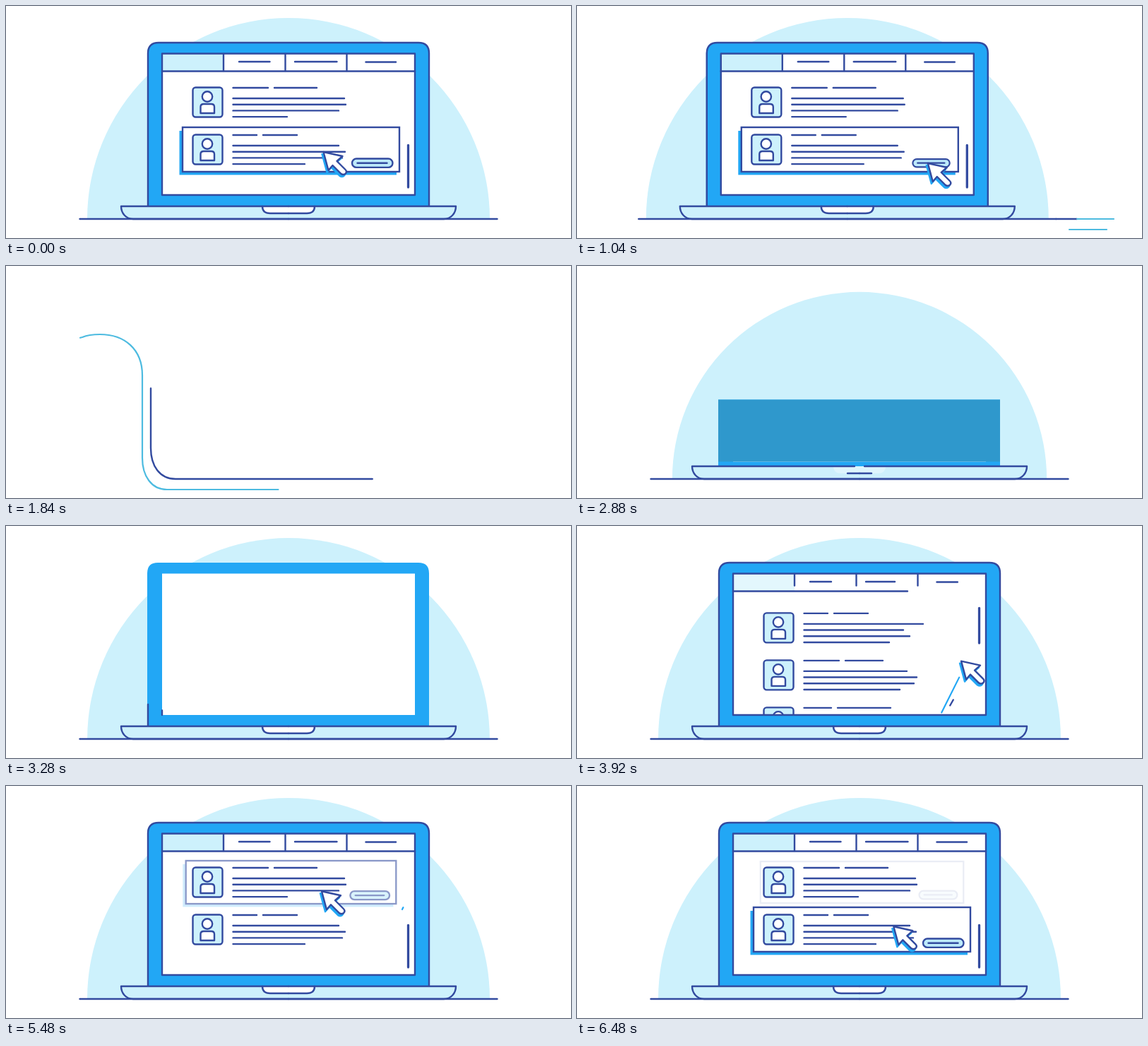
An HTML page for the animation above (6520 ms loop, 800x329 px).

```html
<!DOCTYPE html>
<html lang="en">
<head>
<meta charset="utf-8">
<title>Laptop list</title>
<style>
  html, body { margin: 0; width: 100%; height: 100%; overflow: hidden; background: #fff; }
  svg { display: block; width: 100vw; height: 100vh; }
  .ink { stroke: #324a9f; stroke-width: 2.4; stroke-linecap: round; stroke-linejoin: round; }
  .none { fill: none; }
  .white { fill: #fff; }
  .pale { fill: #cdf1fc; }
  .blue { fill: #22a7f5; }
  .wind { fill: none; stroke: #4dbbe0; stroke-width: 2.2; stroke-linecap: round; }
</style>
</head>
<body>
<svg id="stage" viewBox="0 0 800 329">
  <defs>
    <clipPath id="listClip"><rect x="221" y="94" width="358" height="173.5"/></clipPath>
    <clipPath id="cursorClip"><rect width="800" height="267"/></clipPath>
  </defs>

  <g id="scene">
    <clipPath id="skyClip"><rect width="800" height="302"/></clipPath>
    <circle id="sky" class="pale" cx="400" cy="302" clip-path="url(#skyClip)"/>

    <g id="lid">
      <path id="lidFill" class="blue"/>
      <rect class="white" x="221" y="67.5" width="358" height="200.5"/>
      <rect id="shade" x="200" y="52" width="399" height="216" fill="#2f98cc"/>
    </g>

    <g id="screen">
      <g id="cards"></g>
      <g clip-path="url(#listClip)"><g id="list"></g></g>
      <g id="buttons"></g>
      <rect id="tab" class="pale" x="221" y="68" width="87" height="24"/>
      <g id="tabLines" class="ink none"></g>
      <line id="bar" class="ink" x1="569.5" x2="569.5" style="stroke-width:3.3"/>
    </g>
    <path id="lidLine" class="ink none" pathLength="1" d="M201 284V67Q201 52 216 52H584Q599 52 599 67V284"/>
    <path id="screenLine" class="ink none" pathLength="1" d="M221 268V67.5H579V268Z"/>

    <path id="baseFill" class="pale" d="M163 284H637C637 294 630 302 620 302H180C170 302 163 294 163 284Z"/>
    <path id="notchFill" class="white" d="M363 284H437Q437 294 426 294H374Q363 294 363 284Z"/>
    <g id="baseLines" class="ink none"></g>
    <g id="notchLines" class="ink none"></g>
    <line id="ground" class="ink" x1="104.5" x2="695.5" y1="302" y2="302"/>

    <g clip-path="url(#cursorClip)">
      <line id="trail" class="wind" style="stroke:#22a7f5"/>
      <line id="tick" class="ink"/>
      <g id="cursor">
        <path class="blue" stroke="#22a7f5" stroke-width="2.4" stroke-linejoin="round"
              transform="translate(-2 3)" d="M0 0L27 6L19 13L31 25Q34 28 31 31Q28 33 25 31L13 19L7 26Z"/>
        <path class="ink white" d="M0 0L27 6L19 13L31 25Q34 28 31 31Q28 33 25 31L13 19L7 26Z"/>
      </g>
    </g>
  </g>

  <path id="navyWind" class="ink none" d="M800 302H240C218 302 205 284 205 258V165C205 125 165 112 140 112C70 112 30 150 30 205C30 260 60 302 104 302H696"/>
  <path id="endWind" class="wind" d="M800 302H240"/>
  <path id="cyanWind" class="wind" d="M800 317H228C206 317 193 298 193 272V155C193 118 168 97 133 97C125 97 115 98 108 101C50 115 14 155 14 210C14 270 50 317 104 317H420"/>
</svg>

<script>
const LOOP = 6520;
const ROW = 67;
const $ = id => document.getElementById(id);

const set = (el, attrs) => {
  for (const key in attrs) el.setAttribute(key, attrs[key]);
  return el;
};
const add = (parent, tag, attrs) =>
  parent.appendChild(set(document.createElementNS('http://www.w3.org/2000/svg', tag), attrs));

const linear = p => p;
const outQuad = p => 1 - (1 - p) ** 2;
const outCubic = p => 1 - (1 - p) ** 3;
const inOutQuad = p => p < 0.5 ? 2 * p * p : 1 - 2 * (1 - p) ** 2;
const inOutCubic = p => p < 0.5 ? 4 * p ** 3 : 1 - 4 * (1 - p) ** 3;
const lerp = (a, b, p) => a + (b - a) * p;
const ramp = (t, from, to, ease = linear) =>
  ease(Math.min(1, Math.max(0, (t - from) / (to - from))));

// Linear value along [time, value] stops.
function along(t, stops) {
  const next = stops.findIndex(stop => stop[0] > t);
  if (next === 0) return stops[0][1];
  if (next < 0) return stops[stops.length - 1][1];
  const [a, b] = [stops[next - 1], stops[next]];
  return lerp(a[1], b[1], ramp(t, a[0], b[0]));
}

function show(el, visible) {
  el.style.display = visible ? '' : 'none';
}

function trim(el, tail, head) {
  show(el, head - tail > 0.001);
  set(el, { 'stroke-dasharray': `${head - tail} 9999`, 'stroke-dashoffset': -tail });
}

// Row text: end of first heading part, end of second, ends of the four lines.
const rows = [
  [355, 412, 490, 462, 471, 442],
  [371, 433, 467, 481, 477, 457],
  [360, 444, 476, 475, 485, 457],
  [371, 440, 479, 481, 471, 398],
  [355, 412, 471, 480, 476, 423]
];
rows.forEach(([first, second, ...ends], i) => {
  const row = add($('list'), 'g', { class: 'ink', transform: `translate(0 ${115 + i * ROW})` });
  add(row, 'rect', { class: 'pale', x: 264.5, y: 0.5, width: 42, height: 42, rx: 4 });
  add(row, 'circle', { class: 'white', cx: 285, cy: 13.5, r: 7.2 });
  add(row, 'path', { class: 'white', d: 'M275.5 37V28Q275.5 24 280 24H290.5Q295 24 295 28V37Z' });
  const lines = ends.map((end, n) => `M321.5 ${16 + n * 8.7}H${end}`).join('');
  add(row, 'path', { class: 'none', d: `M321.5 1H${first}M${first + 9} 1H${second}${lines}` });
});

const cards = [3, 4].map(i => {
  const y = 172 + (i - 4) * ROW;
  const card = add($('cards'), 'g', {});
  const shadow = add(card, 'rect', { class: 'blue', x: 245.5, y: y + 5, width: 307.5, height: 62.5 });
  add(card, 'rect', { class: 'ink white', x: 250, y, width: 307, height: 63, style: 'stroke-linejoin:miter' });
  const holder = add($('buttons'), 'g', {});
  const button = add(holder, 'g', { class: 'ink' });
  add(button, 'rect', { x: 490, y: y + 44.5, width: 57.5, height: 12.4, rx: 6.2, fill: '#bdeafb' });
  add(button, 'line', { x1: 497.5, x2: 539.5, y1: y + 50.7, y2: y + 50.7 });
  return { card, shadow, holder, button, cy: y + 31.5 };
});

const tabLines = [
  'M308 68V92', 'M395.5 68V92', 'M482.5 68V92', 'M221 92.5H579',
  'M330 79H373.5', 'M409 79H468.5', 'M509.5 79.5H552'
].map(d => add($('tabLines'), 'path', { d, pathLength: 1 }));

const halves = (id, d) => [1, -1].map(side =>
  add($(id), 'path', { d, pathLength: 1, transform: side < 0 ? 'translate(800 0) scale(-1 1)' : '' }));
const baseLines = halves('baseLines', 'M400 302H180C170 302 163 294 163 284H400');
const notchLines = halves('notchLines', 'M400 294H374Q363 294 363 284');

const scaleAt = (x, y, s) => `translate(${x} ${y}) scale(${s}) translate(${-x} ${-y})`;

// Cursor legs: start, end, target x, target y, easing.
const legs = [
  [3800, 4232, 569, 142, outCubic],
  [4240, 4970, 569, 223, inOutQuad],
  [5080, 5560, 440, 145, inOutQuad],
  [6080, 6760, 451.5, 220, inOutCubic],
  [6760, 7140, 514, 223, inOutQuad]
];
function cursorAt(t) {
  let [x, y] = [502, 275];
  for (const [from, to, toX, toY, ease] of legs) {
    const p = ramp(t, from, to, ease);
    x = lerp(x, toX, p);
    y = lerp(y, toY, p);
  }
  return [x, y];
}

function drawLaptop(t) {
  $('sky').setAttribute('r', 285 * ramp(t, 2189, 3365, outCubic));
  show($('ground'), t >= 2480);

  const base = ramp(t, 2400, 2926, inOutQuad);
  baseLines.forEach(line => trim(line, 0, base));
  $('baseFill').style.opacity = ramp(t, 2500, 2900);
  const notch = ramp(t, 2800, 3005);
  notchLines.forEach(line => trim(line, 0, notch));
  $('notchFill').style.opacity = ramp(t, 2820, 3000);

  const rise = ramp(t, 2660, 3150, inOutQuad);
  const r = 15 * ramp(t, 2950, 3250);
  show($('lid'), rise > 0);
  $('lid').setAttribute('transform', `translate(0 284) scale(1 ${rise}) translate(0 -284)`);
  $('lidFill').setAttribute('d',
    `M200 284V${52 + r}Q200 52 ${200 + r} 52H${599 - r}Q599 52 599 ${52 + r}V284Z`);
  $('shade').style.opacity = 1 - ramp(t, 3000, 3200);
  trim($('lidLine'), 0, ramp(t, 3200, 3800, inOutQuad));
  trim($('screenLine'), 0, ramp(t, 3250, 3820, inOutQuad));
}

function drawScreen(t) {
  const tabs = ramp(t, 3715, 4180, outQuad);
  tabLines.forEach(line => trim(line, 0, tabs));
  $('tab').style.opacity = ramp(t, 3750, 4060);

  const enter = 110 * (1 - ramp(t, 3640, 4120, outCubic));
  const scroll = 3 * ROW * ramp(t, 4260, 5110, inOutQuad);
  show($('list'), t > 3640);
  $('list').style.opacity = ramp(t, 3640, 3760);
  $('list').setAttribute('transform', `translate(0 ${enter - scroll})`);

  const top = 116.5 + 81 * ramp(t, 4240, 4970, inOutQuad);
  const length = 59.5 * ramp(t, 3720, 4060, outQuad);
  show($('bar'), length > 0);
  set($('bar'), { y1: top, y2: top + length });

  const hover = [
    ramp(t, 5420, 5600, outQuad) * (1 - ramp(t, 6260, 6504)),
    ramp(t, 6240, 6440, outQuad)
  ];
  const press = 1 - 0.09 * ramp(t, 7160, 7240);
  cards.forEach(({ card, shadow, holder, button, cy }, i) => {
    const transform = scaleAt(403.5, cy, lerp(0.93, 1, hover[i]));
    for (const part of [card, holder]) {
      set(part, { transform });
      part.style.opacity = hover[i];
      show(part, hover[i] > 0);
    }
    shadow.style.opacity = ramp(hover[i], 0.3, 1);
    if (i === 1) button.setAttribute('transform', scaleAt(518.7, cy + 19.2, press));
  });
}

function drawCursor(t) {
  const [x, y] = cursorAt(t);
  const grab = ramp(t, 4200, 4280) * (1 - ramp(t, 4990, 5080));
  const click = ramp(t, 7120, 7180) * (1 - ramp(t, 7200, 7280));
  show($('cursor'), t >= 3800);
  $('cursor').setAttribute('transform',
    `translate(${x} ${y}) scale(${1 - 0.1 * Math.max(grab, click)})`);

  const tail = lerp(275, 175, ramp(t, 3900, 4100));
  const head = y + 23;
  const pathX = at => 541 + (215 - at) / 2;
  const trailing = t > 3800 && tail > head;
  show($('trail'), trailing);
  show($('tick'), trailing && t < 4000);
  set($('trail'), { x1: pathX(tail), y1: tail, x2: pathX(head), y2: head });
  const tickY = tail - 10;
  set($('tick'), { x1: 528 + (255 - tickY) / 2, y1: tickY, x2: 532.5 + (255 - tickY) / 2, y2: tickY - 8 });
}

const navyLength = $('navyWind').getTotalLength();
const cyanLength = $('cyanWind').getTotalLength();

function drawWind(t) {
  const navyTail = along(t, [[900, 0], [1040, 92], [1360, 92], [1600, 180], [1840, 280], [2480, navyLength - 592]]);
  const navyHead = along(t, [[900, 0], [1040, 121], [1840, 706], [2440, navyLength]]);
  const endTail = along(t, [[900, 0], [1040, 40], [1360, 40], [1600, 180]]);
  const cyanTail = along(t, [[940, 0], [1040, 50], [1360, 60], [1840, 413], [2560, cyanLength]]);
  const cyanHead = along(t, [[900, 0], [1040, 102], [1840, 874], [2300, cyanLength]]);
  trim($('navyWind'), navyTail, navyHead);
  trim($('endWind'), endTail, t < 1600 ? navyTail : endTail);
  trim($('cyanWind'), cyanTail, cyanHead);
  if (t >= 2480) show($('navyWind'), false);
}

function draw(t) {
  // The first part of the loop continues the finished scene, then sweeps it away.
  const leaving = t < 2100;
  const sceneTime = leaving ? t + LOOP : t;
  const shift = leaving ? -17 * (Math.max(0, t - 800) / 240) ** 3 : 0;
  show($('scene'), shift > -720);
  $('scene').setAttribute('transform', `translate(${shift} 0)`);
  drawLaptop(sceneTime);
  drawScreen(sceneTime);
  drawCursor(sceneTime);
  drawWind(t);
}

const start = performance.now();
function tick() {
  draw((performance.now() - start) % LOOP);
  requestAnimationFrame(tick);
}
tick();
</script>
</body>
</html>
```
